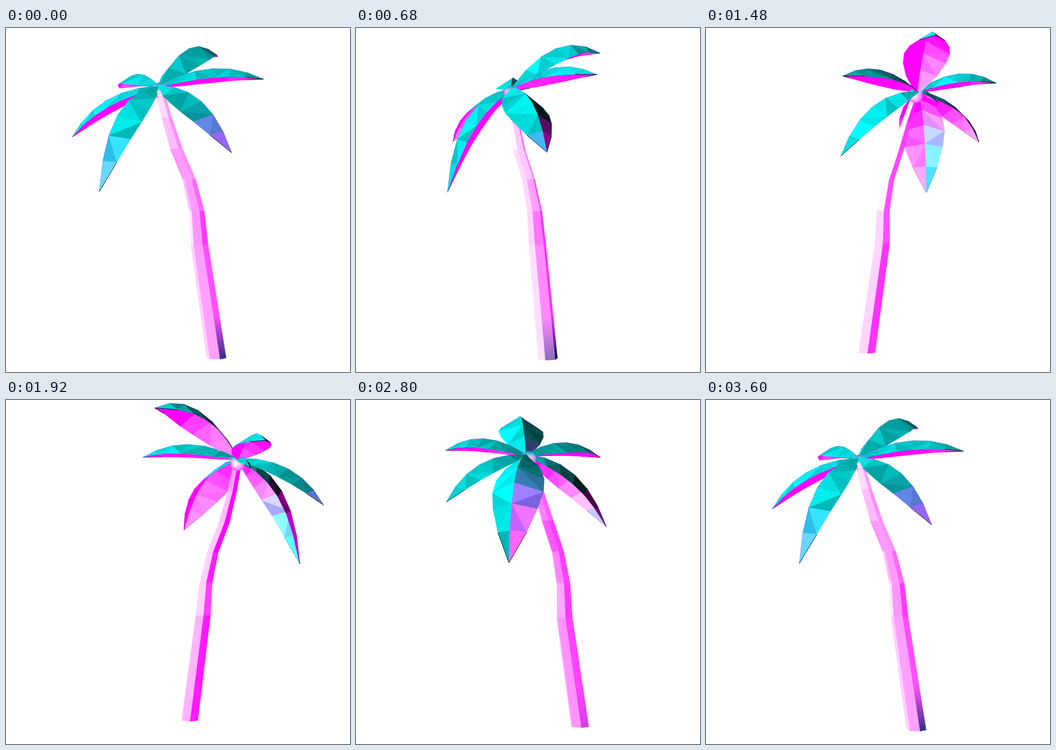
An HTML page with a canvas for the animation above (3640 ms loop, 720 by 720 pixels).

```html
<!DOCTYPE html>
<html lang="en">
<head>
<meta charset="utf-8">
<title>Turning palm</title>
<style>
  html, body { margin: 0; width: 100%; height: 100%; overflow: hidden; background: #fff; }
  canvas { display: block; width: 720px; height: 720px; }
</style>
</head>
<body>
<canvas id="stage" width="720" height="720"></canvas>
<script>
const ctx = document.getElementById('stage').getContext('2d');
const LOOP = 3640, TURN = 3600, STEP = 40;
const CAM = 1900, MID = 360, AXIS = 42;

// x, y (up), z (towards the viewer), radius
const TRUNK = [
  [36, -320, 57, 20], [2, -92, 44, 18], [-3.5, -23, 46, 15.5], [-19, 42, 45, 13.5],
  [-45, 104, 41, 13], [-65, 169, 33, 10.5], [-80, 226, 20, 9]
];
const NUT = [-80, 227, 20];
const CROWN = [-83, 237, 17];
const LEAVES = [
  { tip: [-265, 133, -15], bend: .7, top: 232, w: 40 },
  { tip: [-199, 17, 87], bend: .9, top: 215, w: 60 },
  { tip: [64, 93.5, 105], bend: .7, top: 232, w: 58 },
  { tip: [134, 249, 30], bend: .54, top: 300, w: 45 },
  { tip: [47, 322, -139], bend: .5, top: 375, w: 56 },
  { tip: [-172, 250, -128], bend: .55, top: 300, w: 44 },
  { tip: [-115, 212, -15], bend: .5, top: 245, w: 15 }
];
// half width along a leaf
const WIDTH = [.14, .7, .95, 1, .86, .55, 0];

const add = (a, b, k = 1) => a.map((v, i) => v + b[i] * k);
const sub = (a, b) => add(a, b, -1);
const dot = (a, b) => a[0] * b[0] + a[1] * b[1] + a[2] * b[2];
const cross = (a, b) => [
  a[1] * b[2] - a[2] * b[1], a[2] * b[0] - a[0] * b[2], a[0] * b[1] - a[1] * b[0]
];
const unit = a => { const l = Math.hypot(...a) || 1; return a.map(v => v / l); };
const centre = pts => pts.reduce((s, p) => add(s, p), [0, 0, 0]).map(v => v / pts.length);
const clamp = (v, lo = 0, hi = 1) => Math.max(lo, Math.min(hi, v));
const rgb = (...c) => `rgb(${c.map(v => Math.round(255 * clamp(v)))})`;

let seed = 11;
const random = () => (seed = seed * 16807 % 2147483647) / 2147483647;

function leafFaces({ tip, bend, top, w }) {
  const way = sub(tip, CROWN);
  const ctrl = [CROWN[0] + way[0] * bend, top, CROWN[2] + way[2] * bend];
  const side = unit([-way[2], 0, way[0]]);
  const last = WIDTH.length - 1;
  const rows = WIDTH.map((k, i) => {
    const u = i / last, v = 1 - u;
    const rib = CROWN.map((c, j) => v * v * c + 2 * u * v * ctrl[j] + u * u * tip[j]);
    const dir = unit(CROWN.map((c, j) => v * (ctrl[j] - c) + u * (tip[j] - ctrl[j])));
    const up = cross(side, dir);
    const edge = s => add(add(rib, side, s * k * w * .85), up, -k * w * .53);
    return { rib, '1': edge(1), '-1': edge(-1) };
  });
  const faces = [];
  for (let i = 0; i < last; i++) {
    for (const s of [1, -1]) {
      const a = rows[i], b = rows[i + 1];
      const tris = i % 2
        ? [[a.rib, a[s], b.rib], [a[s], b[s], b.rib]]
        : [[a.rib, a[s], b[s]], [a.rib, b[s], b.rib]];
      for (const pts of tris) faces.push({ pts, s, tint: .86 + .28 * random() });
    }
  }
  return faces;
}

function trunkFaces() {
  const corner = ([x, y, z, r], k) => {
    const a = (12 + 60 * k) * Math.PI / 180;
    return [x + r * Math.cos(a), y, z + r * Math.sin(a)];
  };
  const faces = [];
  for (let i = 0; i < TRUNK.length - 1; i++) {
    for (let k = 0; k < 6; k++) {
      const lo = TRUNK[i], hi = TRUNK[i + 1];
      faces.push({
        pts: [corner(lo, k), corner(lo, k + 1), corner(hi, k + 1), corner(hi, k)],
        level: i, trunk: true
      });
    }
  }
  return faces;
}

const FACES = [...LEAVES.flatMap(leafFaces), ...trunkFaces()];

const spin = (angle) => {
  const c = Math.cos(angle), s = Math.sin(angle);
  return ([x, y, z]) => [x * c - z * s + AXIS, y, x * s + z * c];
};
const project = ([x, y, z]) => {
  const k = CAM / (CAM - z);
  return [MID + x * k, MID - y * k];
};

function leafColour(n, under, tint) {
  const [x, y, z] = n;
  const cyan = clamp((-.55 * x + .55 * y + (under ? .9 : .5) * z) * tint);
  const pink = clamp((.8 * x - 1.6 * y + z) * tint);
  return rgb(pink, cyan, pink + cyan);
}

function trunkColour(n, level, pts, shade) {
  const green = .49 - .48 * n[0] + 1.1 * n[1] + level * .012;
  const plain = rgb(1, green, 1);
  const k = shade * clamp(n[0] + .2);
  if (level || !k) return plain;
  const fill = ctx.createLinearGradient(0, pts[2][1], 0, pts[0][1]);
  fill.addColorStop(0, plain);
  fill.addColorStop(.62, plain);
  fill.addColorStop(1, rgb(1 - k, green * (1 - k * .5), 1 - k * .6));
  return fill;
}

function fillShape(pts, colour) {
  ctx.beginPath();
  for (const p of pts) ctx.lineTo(...p);
  ctx.closePath();
  ctx.fillStyle = ctx.strokeStyle = colour;
  ctx.fill();
  ctx.stroke();
}

function drawNut(place) {
  const [x, y] = project(place), r = 16 * CAM / (CAM - place[2]);
  const ball = ctx.createRadialGradient(x - 5, y + 1, 1, x, y, r);
  ball.addColorStop(0, '#fff');
  ball.addColorStop(.5, '#ffb4ff');
  ball.addColorStop(1, '#f050f0');
  const cap = ctx.createLinearGradient(0, y - r, 0, y);
  cap.addColorStop(0, '#009fb0');
  cap.addColorStop(.4, '#50c8dccc');
  cap.addColorStop(1, '#ffffff00');
  ctx.beginPath();
  ctx.arc(x, y, r, 0, 7);
  for (const paint of [ball, cap]) { ctx.fillStyle = paint; ctx.fill(); }
}

function draw(angle) {
  const turn = spin(angle);
  const shade = clamp(turn(TRUNK[0])[2] / 68);
  const nut = turn(NUT);
  const items = [{ depth: nut[2] + 13, paint: () => drawNut(nut) }];

  for (const face of FACES) {
    const pts = face.pts.map(turn), mid = centre(pts);
    const view = sub([0, 0, CAM], mid);
    let n = unit(cross(sub(pts[1], pts[0]), sub(pts[2], pts[0])));
    const flat = pts.map(project);
    if (face.trunk) {
      const [a, b] = [face.level, face.level + 1].map(i => turn(TRUNK[i]));
      if (dot(n, sub(mid, centre([a, b]))) < 0) n = n.map(v => -v);
      if (dot(n, view) <= 0) continue;
      items.push({
        depth: mid[2],
        paint: () => fillShape(flat, trunkColour(n, face.level, flat, shade))
      });
    } else {
      n = n.map(v => v * face.s);
      const under = dot(n, view) < 0;
      if (under) n = n.map(v => -v);
      items.push({
        depth: mid[2],
        paint: () => fillShape(flat, leafColour(n, under, face.tint))
      });
    }
  }

  ctx.fillStyle = '#fff';
  ctx.fillRect(0, 0, 720, 720);
  ctx.lineWidth = .6;
  ctx.lineJoin = 'round';
  items.sort((a, b) => a.depth - b.depth).forEach(item => item.paint());
}

function tick() {
  const time = Math.floor(performance.now() % LOOP / STEP) * STEP;
  const u = Math.min(1, time / TURN);
  draw(2 * Math.PI * u * u * (3 - 2 * u));
  requestAnimationFrame(tick);
}
tick();
</script>
</body>
</html>
```
